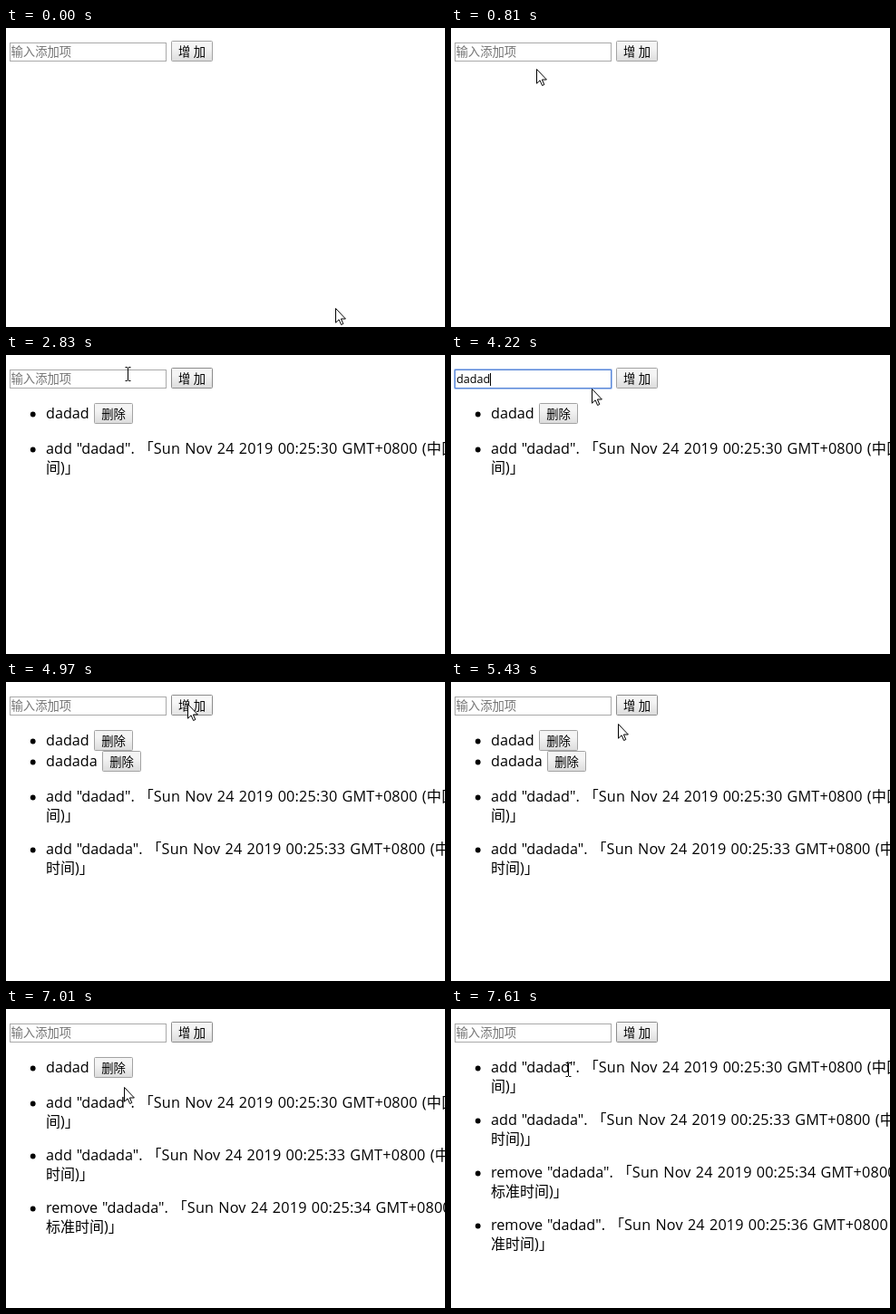
These frames come from a looping animation (484x330 px, 7.99 s). An HTML page:

```html
<!DOCTYPE html>
<html lang="zh">
<head>
<meta charset="utf-8">
<title>列表增删</title>
<style>
html, body { margin: 0; width: 100%; height: 100%; overflow: hidden; background: #fff; }
svg { display: block; width: 484px; height: 330px; }
text { font-family: "Open Sans", "Noto Sans CJK SC", "Noto Sans CJK", sans-serif; font-size: 16.2px; word-spacing: .7px; fill: #000; white-space: pre; }
.date { letter-spacing: .2px; }
.cjk { font-size: 16px; }
.label { font-size: 13.33px; word-spacing: 0; text-anchor: middle; }
.typed { font-size: 12.6px; }
.hint { font-size: 13.33px; fill: #757575; }
</style>
</head>
<body>
<svg viewBox="0 0 484 330" width="484" height="330">
  <defs>
    <linearGradient id="up" x2="0" y2="1"><stop offset=".35" stop-color="#f4f4f4"/><stop offset="1" stop-color="#dcdcdc"/></linearGradient>
    <linearGradient id="hover" x2="0" y2="1"><stop offset=".35" stop-color="#f8f8f8"/><stop offset="1" stop-color="#e3e3e3"/></linearGradient>
    <linearGradient id="down" x2="0" y2="1"><stop offset="0" stop-color="#d8d8d8"/><stop offset="1" stop-color="#ededed"/></linearGradient>
  </defs>
  <g id="page"></g>
  <path id="arrow" d="M.5 .5V16.2L4.1 12.8L6.6 18.5L8.8 17.5L6.4 12H11.4Z" fill="#fff" stroke="#000"/>
  <path id="beam" d="M-2.5 -7.5H0M1 -7.5H3.5M.5 -7V7M-2.5 7.5H0M1 7.5H3.5" fill="none" stroke="#000"/>
</svg>
<script>
const LOOP = 7990;
const LINE = 21, ITEM = 23, GAP = 16, TOP = 53, LEFT = 44;
const page = document.getElementById('page');
const arrow = document.getElementById('arrow');
const beam = document.getElementById('beam');

// Pointer moves: start, end, x, y
const moves = [
  [40, 810, 94, 45], [900, 1220, 103, 34], [1370, 1420, 103, 30], [1610, 1780, 134, 29],
  [2060, 2400, 202, 26], [2540, 2800, 134, 21], [3200, 3300, 129, 24], [3660, 3940, 138, 34],
  [4120, 4220, 155, 37], [4220, 4510, 200, 24], [5300, 5430, 184, 46], [5430, 5750, 136, 108],
  [5750, 6040, 130, 88], [6950, 7250, 129, 67]
];

// Each item is typed, added and later removed
const items = [
  { name: 'dadad', focus: 1610, typing: 1760, gap: 90, press: 2450, added: 2530, removed: 7560 },
  { name: 'dadada', focus: 3660, typing: 3690, gap: 125, press: 4790, added: 4860, removed: 6500 }
];
const logs = items.flatMap(({ name, added, removed }) => [
  { at: added, verb: 'add', name }, { at: removed, verb: 'remove', name }
]).sort((a, b) => a.at - b.at);

const text = (x, y, s, cls = '') => `<text x="${x}" y="${y}" class="${cls}">${s}</text>`;
const box = (x, y, w, h, attrs) => `<rect x="${x + .5}" y="${y + .5}" width="${w - 1}" height="${h - 1}" ${attrs}/>`;
const bullet = y => `<circle cx="29.7" cy="${y - 4.5}" r="2.9"/>`;
const inside = (p, x, y, w, h) => p.x >= x && p.x < x + w && p.y >= y && p.y < y + h;
const between = (t, a, b) => t >= a && t < b;

function pointer(t) {
  let x = 363, y = 309;
  for (const [start, end, toX, toY] of moves) {
    if (t < start) break;
    const k = Math.min(1, (t - start) / (end - start));
    const ease = k * k * (3 - 2 * k);
    x += (toX - x) * ease;
    y += (toY - y) * ease;
  }
  return { x: Math.round(x), y: Math.round(y) };
}

function button(p, x, y, w, label, held, focused) {
  const over = inside(p, x, y, w, ITEM);
  const fill = held ? 'down' : over ? 'hover' : 'up';
  const edge = over || focused ? '#8c8c8c' : '#a3a3a3';
  return box(x, y, w, ITEM, `rx="1" fill="url(#${fill})" stroke="${edge}"`) +
    text(x + w / 2, y + 17, label, 'label');
}

function form(t, p) {
  const item = items.find(i => between(t, i.focus, i.added));
  const active = item && t < item.press;
  const count = item ? Math.max(0, Math.floor((t - item.typing) / item.gap) + 1) : 0;
  const typed = item ? item.name.slice(0, count) : '';
  let s = box(4, 16, 173, 21, 'fill="#fff" stroke="#a9a9a9"');
  if (active) {
    const caret = Math.floor(6 + typed.length * 7.4) + .5;
    s += box(3, 15, 175, 23, 'rx="1" fill="none" stroke="#a5bfee"') +
      box(4, 16, 173, 21, 'fill="none" stroke="#5b88d8"') +
      `<path d="M${caret} 20V34" stroke="#000"/>`;
  }
  s += typed ? text(6, 31, typed, 'typed') : text(5.5, 31, '输入添加项', 'hint');
  return s + button(p, 182, 14, 46, '增 加', item && !active, t >= items[0].press && !active);
}

function itemRow(t, p, y, { name, removed }) {
  const x = LEFT + 8 + name.length * 9;
  return bullet(y + 17) + text(LEFT, y + 17, name) +
    button(p, x, y, 43, '删除', between(t, removed - 150, removed));
}

function logRow(y, { at, verb, name }) {
  const sec = Math.floor(28.45 + at / 1000);
  // A longer first line pushes more characters to the second
  const wrapped = name.length - 4 + (verb === 'remove' ? 2 : 0);
  const zone = '中国标准时间';
  const date = `Sun Nov 24 2019 00:25:${sec} GMT+0800 (${zone.slice(0, -wrapped)}`;
  return bullet(y) +
    text(LEFT, y, `${verb} "${name}". <tspan class="cjk">「</tspan><tspan class="date">${date}</tspan>`) +
    text(LEFT, y + LINE, zone.slice(-wrapped) + ')」', 'cjk');
}

function draw(t, p) {
  const shown = items.filter(i => between(t, i.added, i.removed));
  const logTop = TOP + (shown.length ? shown.length * ITEM + GAP : 0);
  return form(t, p) +
    shown.map((item, i) => itemRow(t, p, TOP + i * ITEM, item)).join('') +
    logs.filter(l => t >= l.at).map((l, i) => logRow(logTop + 17 + i * (2 * LINE + GAP), l)).join('');
}

let last = '';
function render(t) {
  const p = pointer(t);
  const s = draw(t, p);
  if (s !== last) page.innerHTML = last = s;
  const overText = inside(p, 4, 16, 173, 21) || t >= items[0].removed;
  arrow.style.display = overText ? 'none' : '';
  beam.style.display = overText ? '' : 'none';
  (overText ? beam : arrow).setAttribute('transform', `translate(${p.x} ${p.y})`);
}

const t0 = performance.now();
function tick() {
  render((performance.now() - t0) % LOOP);
  requestAnimationFrame(tick);
}
tick();
</script>
</body>
</html>
```
